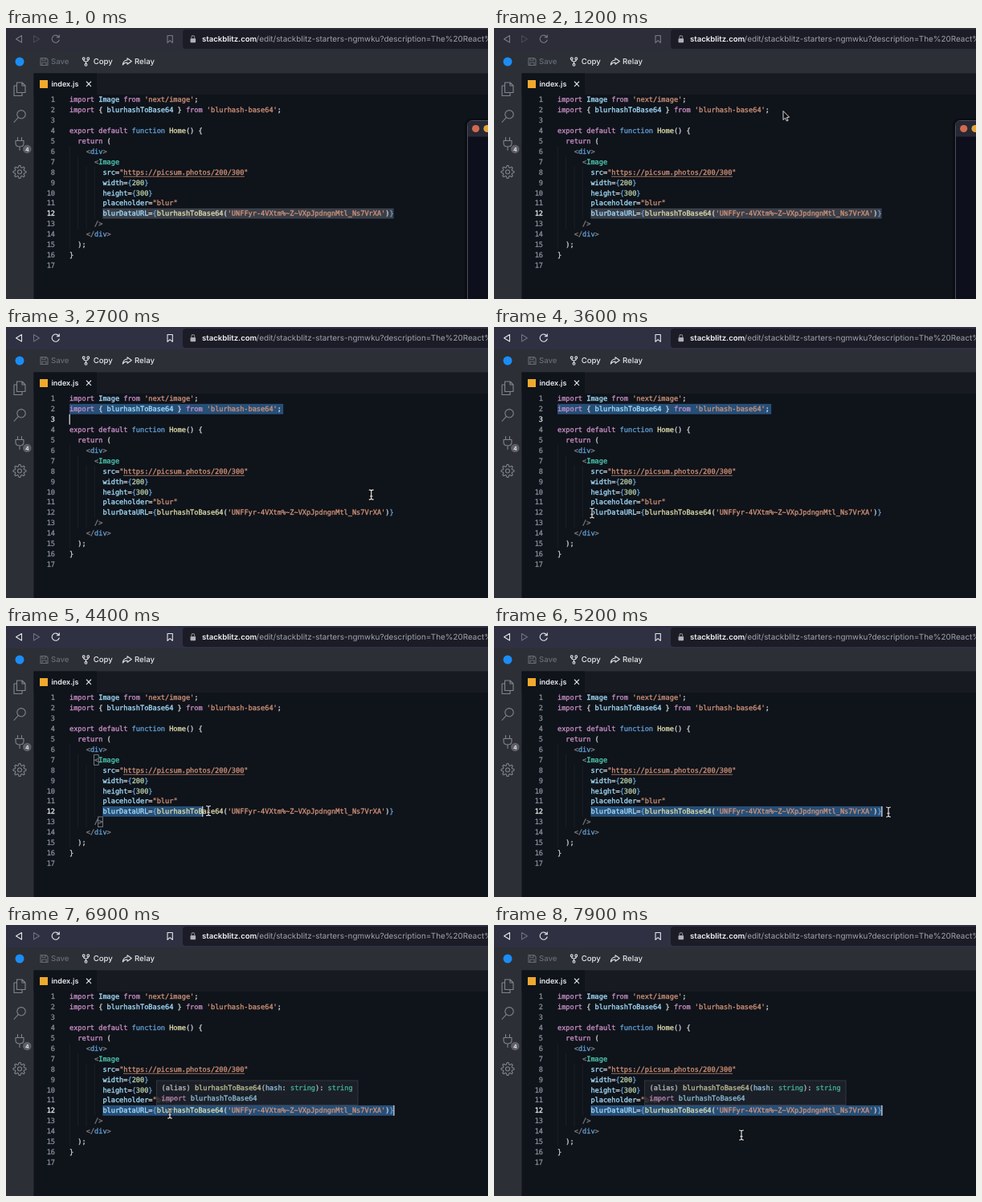
Recreate the animation shown at these times as an HTML page. Size 600 by 338 pixels, loop 8000 ms.

```html
<!DOCTYPE html>
<html lang="en">
<head>
<meta charset="utf-8">
<title>Code editor</title>
<style>
html, body { margin: 0; width: 100%; height: 100%; overflow: hidden; background: #0f131a; }
svg { display: block; width: 600px; height: 338px; }
text { font-family: Inter, "Open Sans", sans-serif; white-space: pre; text-rendering: geometricPrecision; }
.code { font: 8.6px "DejaVu Sans Mono", "Liberation Mono", monospace; stroke-width: .32px; }
.k { fill: #c98fc6; stroke: #c98fc6; }
.v { fill: #a3dcfa; stroke: #a3dcfa; }
.s { fill: #ce9178; stroke: #ce9178; }
.p { fill: #d4d4d4; stroke: #d4d4d4; }
.b { fill: #62a0d6; stroke: #62a0d6; }
.f { fill: #dcdcaa; stroke: #dcdcaa; }
.n { fill: #b5cea8; stroke: #b5cea8; }
.t { fill: #4ec9b0; stroke: #4ec9b0; }
.g { fill: #808080; stroke: #808080; }
.num { fill: #858b96; stroke: #858b96; }
.num.on { fill: #e6e8ec; stroke: #e6e8ec; }
.icon { fill: none; stroke: #80848c; stroke-width: 1.1; stroke-linejoin: round; stroke-linecap: round; }
.white { stroke: #dfe1e5; }
</style>
</head>
<body>
<svg viewBox="0 0 600 338" xmlns="http://www.w3.org/2000/svg">
  <rect width="600" height="338" fill="#0f131a"/>

  <!-- browser bar -->
  <rect id="bar" width="600" height="28"/>
  <rect x="220" y="2" width="400" height="24" rx="4" fill="#1b1c26"/>
  <g id="nav" class="icon">
    <path d="M19.5 9.5V18L12.5 13.7Z"/>
    <path d="M34.5 9.5V18L41.5 13.7Z" opacity=".35"/>
    <path d="M65.8 11.4A4.6 4.6 0 1 0 66.2 15M66.3 8.8V11.8H63.3"/>
    <path d="M201 9.5H207.3V18.3L204.1 15.6L201 18.3Z"/>
  </g>
  <rect x="229.5" y="13" width="6.6" height="5.3" rx="1" fill="#aeb1ba"/>
  <path class="icon" d="M230.9 13V11.5A1.9 1.9 0 0 1 234.7 11.5V13"/>
  <text x="244" y="17.3" font-size="9.6" font-weight="600" fill="#f1f2f5">stackblitz.com</text>
  <text x="311.6" y="17.3" font-size="9.9" fill="#a0a3ad">/edit/stackblitz-starters-ngmwku?description=The%20React%20framework</text>

  <!-- tool bar, side bar and tabs -->
  <rect y="56" width="600" height="27" fill="#171a21"/>
  <path d="M0 28H600V56.5H34.5V338H0Z" fill="#2c2f36"/>
  <rect x="34.5" y="56.5" width="78.5" height="26.5" fill="#0f131a"/>
  <circle cx="17" cy="42" r="5.5" fill="#1b8df5"/>
  <g class="icon" opacity=".7">
    <path d="M43 37.5H50L52 39.5V46.5H43ZM45 37.5V40.2H49V37.5M45 46.5V43H50V46.5"/>
  </g>
  <text x="56" y="45.4" font-size="9.6" font-weight="500" fill="#686c75">Save</text>
  <g class="icon white">
    <circle cx="96.7" cy="38.3" r="1.4"/><circle cx="102.3" cy="38.3" r="1.4"/><circle cx="99.5" cy="45.8" r="1.4"/>
    <path d="M96.7 39.8Q96.7 42 99.5 42T102.3 39.8M99.5 42V44.3"/>
    <path d="M151 37.8L156.3 41.5L151 45.2V43Q147.5 42.8 145.3 46Q145.8 40.5 151 40Z"/>
  </g>
  <g font-size="9.6" font-weight="500" fill="#e6e8eb">
    <text x="108.7" y="45.4">Copy</text>
    <text x="160" y="45.4">Relay</text>
  </g>
  <rect x="42" y="65" width="10" height="10" fill="#f0a92d"/>
  <text x="56.5" y="73.2" font-size="9" font-weight="600" fill="#eceef1">index.js</text>
  <path class="icon white" d="M100.3 67L105.7 72.6M105.7 67L100.3 72.6"/>

  <g class="icon">
    <path d="M13.5 68H20L24 72V80.5H13.5ZM20 68V72H24M13.5 72H10V84.5H20V80.5"/>
    <circle cx="19" cy="107.8" r="5.2"/><path d="M15.3 111.7L10 117.5"/>
    <path d="M14.5 136.5V140.5M19.5 136.5V140.5M12 140.5H22V144Q22 148 17 148T12 144ZM17 148V152.5"/>
    <circle cx="17" cy="179.5" r="2.5"/><path id="gear"/>
  </g>
  <circle cx="26.3" cy="151" r="5.3" fill="#5d6068"/>
  <text x="26.3" y="153.6" font-size="7" font-weight="600" text-anchor="middle" fill="#f0f1f3">4</text>

  <!-- editor -->
  <path d="M79.3 147V276M89.6 160V251M100 173V251M110.4 173V238" stroke="#222730" stroke-width=".7"/>
  <rect id="sel" height="12.9"/>
  <g id="lines"></g>
  <path d="M146 185.3H297" stroke="#ce9178" stroke-width=".7"/>
  <g id="pair" fill="none" stroke="#8d929c" stroke-width=".8">
    <rect x="109.6" y="160.7" width="5.6" height="12.6"/>
    <rect x="114.7" y="238" width="5.6" height="12.6"/>
  </g>
  <rect id="caret" width="1.2" height="12.9" fill="#e4e6ea"/>

  <g id="tip">
    <rect x="187.5" y="194" width="250.5" height="30.5" fill="#20242c" fill-opacity=".9" stroke="#414650" stroke-width=".8"/>
    <text class="code" x="193.5" y="206.2" id="tip1"></text>
    <text class="code" x="193.5" y="219.2" id="tip2"></text>
  </g>

  <!-- second window -->
  <g id="win">
    <rect x="571" y="113" width="60" height="260" rx="8" fill="#000" opacity=".3"/>
    <rect x="574.5" y="115.5" width="60" height="260" rx="6" fill="#0d0f1d" stroke="#4b4e5c"/>
    <path d="M575 135.5V121.5Q575 116 580.5 116H600V135.5Z" fill="#262833"/>
    <circle cx="584.7" cy="125.5" r="4.6" fill="#d2694f"/>
    <circle cx="599" cy="125.5" r="4.6" fill="#e3a43a"/>
  </g>

  <path id="arrow" d="M0 0V11L2.6 8.7L4.4 12.6L6.1 11.8L4.4 8L7.6 7.7Z" fill="#0a0a0a" stroke="#f2f2f2" stroke-width=".9"/>
  <g id="beam" fill="none" stroke-linecap="round">
    <path d="M-2.5 -6Q0 -6 0 -4.5Q0 -6 2.5 -6M0 -4.5V4.5M-2.5 6Q0 6 0 4.5Q0 6 2.5 6M-1.3 1.8H1.3" stroke="#0a0a0a" stroke-width="2.4"/>
    <path d="M-2.5 -6Q0 -6 0 -4.5Q0 -6 2.5 -6M0 -4.5V4.5M-2.5 6Q0 6 0 4.5Q0 6 2.5 6M-1.3 1.8H1.3" stroke="#f2f2f2" stroke-width="1.1"/>
  </g>
</svg>
<script>
const LOOP = 8000, CHAR = 5.177, LEFT = 79, INDENT = 120.3, ROW = 12.9, TOP = 83;
const $ = id => document.getElementById(id);
const set = (id, attrs) => { for (const key in attrs) $(id).setAttribute(key, attrs[key]); };
const show = (id, on) => $(id).setAttribute('visibility', on ? 'visible' : 'hidden');
const clamp = (v, max) => Math.max(0, Math.min(max, v));
const rowY = row => TOP + (row - 1) * ROW;

// Each token starts with the letter of its colour class.
const code = [
  "kimport |vImage |kfrom |s'next/image'|p;",
  "kimport |p{ |vblurhashToBase64 |p} |kfrom |s'blurhash-base64'|p;",
  "",
  "kexport default |bfunction |fHome|p() {",
  "p  |kreturn |p(",
  "p    |g<|bdiv|g>",
  "p      |g<|tImage",
  'p        |vsrc|p=|s"https://picsum.photos/200/300"',
  "p        |vwidth|p=|b{|n200|b}",
  "p        |vheight|p=|b{|n300|b}",
  'p        |vplaceholder|p=|s"blur"',
  "p        |vblurDataURL|p=|b{|fblurhashToBase64|p(|s'UNFFyr-4VXtm%~Z~VXpJpdngnMtl_Ns7VrXA'|p)|b}",
  "p      |g/>",
  "p    |g</|bdiv|g>",
  "p  );",
  "p}",
  ""
];

function paint(el, line) {
  for (const token of line.split('|').filter(Boolean)) {
    const span = document.createElementNS(el.namespaceURI, 'tspan');
    span.setAttribute('class', token[0]);
    span.textContent = token.slice(1);
    el.append(span);
  }
}

function addText(x, y, cls) {
  const el = document.createElementNS($('lines').namespaceURI, 'text');
  el.setAttribute('x', x);
  el.setAttribute('y', y);
  el.setAttribute('class', cls);
  $('lines').append(el);
  return el;
}

const numbers = code.map((line, i) => {
  const y = rowY(i + 1) + 9.4;
  paint(addText(LEFT, y, 'code'), line);
  const num = addText(61, y, 'code num');
  num.setAttribute('text-anchor', 'end');
  num.textContent = i + 1;
  return num;
});
paint($('tip1'), 'p(alias) |fblurhashToBase64|p(|vhash|p: |tstring|p): |tstring');
paint($('tip2'), 'kimport |vblurhashToBase64');

const teeth = Array.from({ length: 32 }, (_, i) => {
  const r = i % 4 < 2 ? 8 : 5.8, a = (i - .5) * Math.PI / 16;
  return (17 + r * Math.cos(a)).toFixed(1) + ' ' + (179.5 + r * Math.sin(a)).toFixed(1);
});
set('gear', { d: 'M' + teeth.join('L') + 'Z' });

// time, x, y of the pointer
const path = [
  [400, 300, 224], [700, 129, 224], [950, 200, 112], [1200, 360, 103.5],
  [1300, 360.5, 105], [2400, 360.5, 105], [2750, 460, 215], [3000, 300, 273],
  [3250, 136, 250], [3400, 122, 232], [3800, 122, 232], [4400, 252, 230.5],
  [4880, 491, 232], [5350, 491, 232], [5820, 126, 237], [6000, 139, 237],
  [6180, 206, 234.5], [6850, 206, 234.5], [7120, 184, 240], [7700, 308, 262]
];

function pointer(t) {
  const i = path.findIndex(step => step[0] > t);
  if (i < 0) return path[path.length - 1].slice(1);
  if (i === 0) return path[0].slice(1);
  const [t0, x0, y0] = path[i - 1], [t1, x1, y1] = path[i];
  let u = (t - t0) / (t1 - t0);
  u = u * u * (3 - 2 * u);
  return [x0 + (x1 - x0) * u, y0 + (y1 - y0) * u];
}

function select(row, x, width, color) {
  set('sel', { x, y: rowY(row), width, fill: color });
}

function render(t) {
  const [x, y] = pointer(t);
  const focus = t >= 1500, picked = t >= 1650, dragging = t >= 3700;
  const activeRow = picked && !dragging ? 3 : 12;

  set('bar', { fill: focus ? '#2f3042' : '#2c2d38' });
  set('nav', { style: 'stroke:' + (focus ? '#e4e6ea' : '#777b85') });
  show('win', t < 1300);
  numbers.forEach((num, i) => num.classList.toggle('on', i + 1 === activeRow));

  const blue = '#264f78', full = 70 * CHAR;
  let caretX = LEFT, since = 1650;
  if (!picked) {
    select(12, INDENT, full, focus ? blue : '#3a3f49');
    caretX = INDENT + full;
  } else if (!dragging) {
    select(2, LEFT, 52 * CHAR - 3, blue);
  } else {
    const reach = t >= 4880 ? 70 : clamp(Math.floor((x - 125) / CHAR), 70);
    select(12, INDENT, reach * CHAR, blue);
    caretX = INDENT + reach * CHAR;
    since = t >= 4880 ? 4880 : t;
  }
  set('caret', { x: caretX - .4, y: rowY(activeRow) });
  show('caret', focus && Math.max(0, t - since) % 1000 < 500);

  show('pair', t >= 3750 && t < 4550);
  set('tip', { opacity: .85 * clamp((t - 6070) / 240, 1) });

  const place = `translate(${x.toFixed(2)} ${y.toFixed(2)})`;
  set('arrow', { transform: place });
  set('beam', { transform: place });
  show('arrow', t >= 400 && t < 1300);
  show('beam', t >= 1300);
}

const start = performance.now();
function tick(now) {
  render(Math.max(0, now - start) % LOOP);
  requestAnimationFrame(tick);
}
render(0);
requestAnimationFrame(tick);
</script>
</body>
</html>
```
